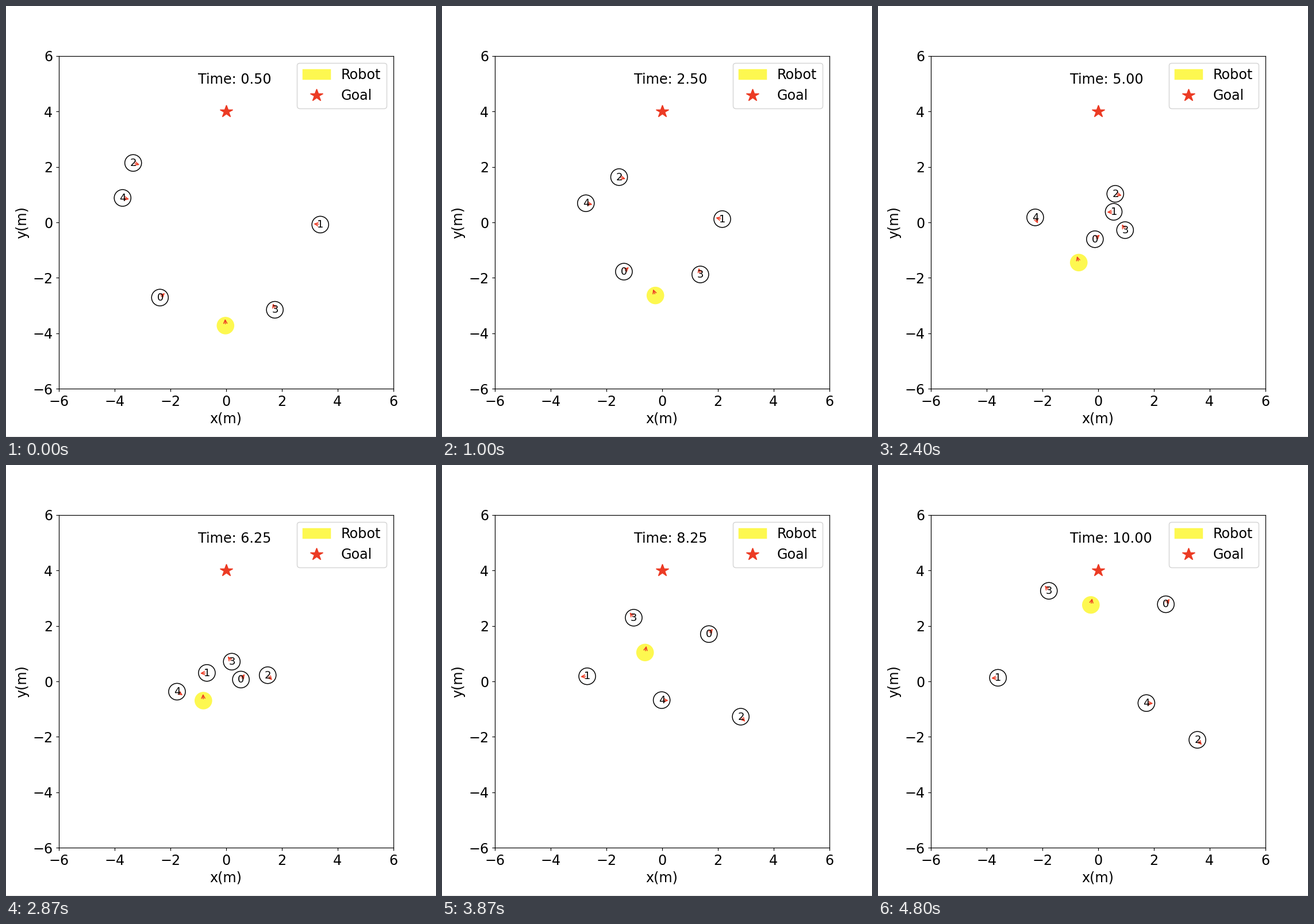
Animation, 748 px wide and 749 px high, one loop 4.87 s. Source, as a matplotlib script:

```python
from math import comb

import numpy as np
import matplotlib.pyplot as plt
from matplotlib.animation import FuncAnimation
from matplotlib.lines import Line2D
from matplotlib.patches import ArrowStyle, Circle, FancyArrowPatch

W, H, DPI = 748, 749, 107.7
FRAMES, LOOP = 73, 4870
DT, T0, STEPS = 0.25, 0.5, 39
RADIUS = 0.3
RED, YELLOW = "#ec3b24", "#fdf850"

plt.rcParams["font.family"] = "DejaVu Sans"

# Each route: start, avoidance legs (last step, Bezier points), goal; metres.
ROBOT = ((-.02, -3.72),
         [(28, (-.06, -2.2), (-1.07, -1.85), (-.76, .305))], (0, 4))
HUMANS = [
    ((-2.37, -2.71), [(22, (.39, -.14))], (2.58, 2.99)),
    ((3.38, -.08), [(16, (2.10, .07), (1.06, .41))], (-3.73, .12)),
    ((-3.33, 2.14), [(19, (-1.17, 1.52), (.83, .97))], (3.69, -2.25)),
    ((1.75, -3.15), [(18, (1.30, -1.72), (.97, -.28))], (-1.90, 3.44)),
    ((-3.71, .88), [(15, (-2.52, .65), (-2.35, .61)),
                    (26, (-2.31, -.25), (-1.26, -.60))], (3.34, -.88)),
]


def bezier(points, t):
    d = len(points) - 1
    return sum(comb(d, i) * t**i * (1 - t)**(d - i) * np.array(p)
               for i, p in enumerate(points))


def travel(start, legs, goal):
    """Dodge along the legs, then go for the goal at 1 m/s, slowing near it."""
    path = [np.array(start)]
    for end, *points in legs:
        count = end + 1 - len(path)
        leg = [path[-1], *points]
        path += [bezier(leg, i / count) for i in range(1, count + 1)]
    while len(path) < STEPS:
        gap = np.array(goal) - path[-1]
        path.append(path[-1] + DT * gap / max(1, np.hypot(*gap)))
    path = np.array(path)
    vel = np.gradient(path, axis=0)
    heading = vel / np.hypot(vel[:, 0], vel[:, 1])[:, None]
    return path, path + RADIUS * heading


fig = plt.figure(figsize=((W + .01) / DPI, (H + .01) / DPI), dpi=DPI,
                 facecolor="white")
fig.add_artist(Line2D([0, 1], [.5 / H] * 2, color="#e4e4e4", lw=.7))
ax = fig.add_axes([91.7 / W, 83.6 / H, 582.1 / W, 578.8 / H])
ax.set(xlim=(-6, 6), ylim=(-6, 6))
ax.tick_params(labelsize=16)
ax.set_xlabel("x(m)", fontsize=16)
ax.set_ylabel("y(m)", fontsize=16)

goal, = ax.plot([0], [4], "*", color=RED, markersize=15)
clock = ax.text(-1, 5, "", fontsize=16)


def add_agent(route, label=None):
    path, tips = travel(*route)
    if label is None:
        body = Circle(path[0], RADIUS, color=YELLOW)
        text = None
    else:
        body = Circle(path[0], RADIUS, fill=False, ec="black")
        text = ax.text(0, 0, label, fontsize=12)
    arrow = FancyArrowPatch(path[0], tips[0], color=RED,
                            arrowstyle=ArrowStyle("->", head_length=4,
                                                  head_width=2))
    ax.add_patch(body)
    ax.add_patch(arrow)
    return path, tips, body, arrow, text


agents = [add_agent(ROBOT)]
agents += [add_agent(route, str(i)) for i, route in enumerate(HUMANS)]
ax.legend([agents[0][2], goal], ["Robot", "Goal"], fontsize=16,
          loc="upper right")


def update(k):
    # 8 simulation steps every 15 frames
    n = min((8 * k + 3) // 15, STEPS - 1)
    clock.set_text(f"Time: {T0 + n * DT:.2f}")
    for path, tips, body, arrow, text in agents:
        body.center = path[n]
        arrow.set_positions(path[n], tips[n])
        if text:
            text.set_position(path[n] - .11)
    return []


anim = FuncAnimation(fig, update, frames=FRAMES, interval=LOOP / FRAMES,
                     init_func=lambda: update(0), repeat=True,
                     repeat_delay=0, blit=False)
plt.show()
```
